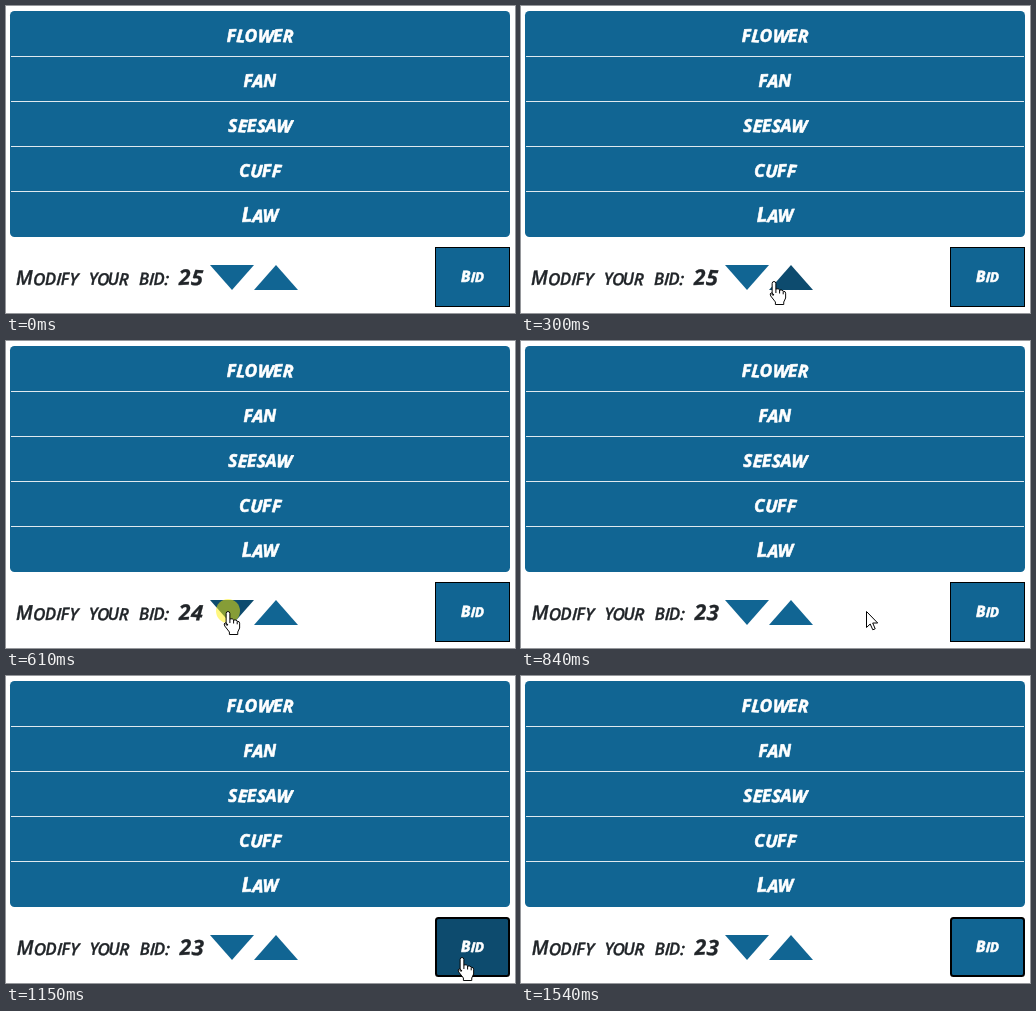
An HTML page that plays this animation: 509 by 307 pixels, repeating every 1.92 s.

```html
<!DOCTYPE html>
<html lang="en">
<head>
<meta charset="utf-8">
<title>Modify your bid</title>
<style>
  html, body { margin: 0; width: 100%; height: 100%; overflow: hidden; background: #fff; }
  svg { display: block; width: 509px; height: 307px; }
  text {
    font: italic 700 17.5px "Permanent Marker", "Open Sans", sans-serif;
    stroke-width: .6; stroke-linejoin: round; white-space: pre;
  }
  .light { fill: #fff; stroke: #fff; }
  .dark { fill: #212529; stroke: #212529; stroke-width: .3; }
  .label { font-weight: 600; font-size: 17px; }
</style>
</head>
<body>
<svg id="stage" viewBox="0 0 509 307">
  <rect x="4" y="5" width="500" height="226" rx="4.5" fill="#116593"/>
  <path d="M5 50.5H503M5 95.5H503M5 140.5H503M5 185.5H503" stroke="#dfe9ef"/>
  <g id="words"></g>
  <g id="label"></g>
  <path id="down" d="M204 259H248L226 284Z"/>
  <path id="up" d="M248 284H292L270 259Z"/>
  <rect id="button" stroke="#000"/>
  <g id="bid"></g>
  <g id="pointer">
    <circle id="press" r="12" fill="#fff000" fill-opacity=".5"/>
    <g id="hand" stroke="#000" stroke-linejoin="round">
      <path fill="#fff" d="M-2 14V2.5a2 2 0 0 1 4 0V8q3-1 4 1 3-.5 4 1.2 2.5 0 2.5 2V17l-2 4v2.5h-9V21l-5-6q-1.5-2.5 .5-3.2 1.5 0 3 2.2z" transform="scale(.93 1)"/>
      <path fill="none" d="M1.9 8v4M5.6 9v3.5M9.2 10.3v3"/>
    </g>
    <path id="arrow" fill="#fff" stroke="#000" d="M.5 .5V16.5L4.2 13 6.8 18.8 9.2 17.8 6.7 12H11.7Z"/>
  </g>
</svg>
<script>
const $ = id => document.getElementById(id);
const SVG = "http://www.w3.org/2000/svg";
const LOOP = 1920;
const BLUE = [17, 101, 147], DEEP = [13, 75, 110];

// Redraw moments in ms
const ticks = [0, 70, 150, 230, 300, 380, 460, 540, 610, 690, 770, 840,
  920, 1000, 1070, 1150, 1230, 1300, 1380, 1460, 1540];

// Pointer path: time, x, y
const path = [
  [70, 411, 287], [150, 345, 283], [230, 284, 278], [300, 253, 275],
  [380, 226, 272], [460, 222, 270], [690, 222, 270], [770, 270, 272],
  [840, 345, 270], [920, 434, 270], [1000, 453, 270], [1070, 453, 270],
  [1150, 456, 281], [1230, 458, 303]
];

// Marker lettering: capitals with a slightly uneven stance
function write(parent, str, x, y, opt = {}) {
  const el = document.createElementNS(SVG, "text");
  const set = (k, v) => el.setAttribute(k, v);
  set("x", x);
  set("y", y);
  set("class", opt.style || "light");
  set("text-anchor", opt.anchor || "start");
  set("rotate", [...str].map((c, i) => (i % 2 ? 3 : -2)).join(" "));
  if (opt.gap) set("letter-spacing", opt.gap);
  if (opt.size) el.style.fontSize = opt.size + "px";
  if (opt.cap) {
    const first = document.createElementNS(SVG, "tspan");
    first.style.fontSize = opt.cap + "px";
    first.textContent = str[0].toUpperCase();
    el.append(first, str.slice(1).toUpperCase());
  } else {
    el.textContent = str.toUpperCase();
  }
  parent.append(el);
  return el;
}

["flower", "fan", "seesaw", "cuff", "Law"].forEach((word, i) => {
  write($("words"), word, 254, 36 + 45 * i,
    { anchor: "middle", cap: word === "Law" ? 20.5 : 0 });
});

const ink = "dark label";
write($("label"), "Modify", 10, 279, { style: ink, cap: 20, gap: -.3 });
write($("label"), "your", 83, 279, { style: ink, gap: -1.1 });
write($("label"), "bid:", 133, 279, { style: ink, gap: -.5 });
const count = write($("label"), "25", 173, 279, { style: "dark", size: 21.5 });
write($("bid"), "Bid", 466.5, 276, { anchor: "middle", cap: 15.5, size: 13.5 });

const clamp = v => Math.max(0, Math.min(1, v));
const mix = k => `rgb(${BLUE.map((c, i) => Math.round(c + (DEEP[i] - c) * k))})`;
const within = (p, x, y, w, h) =>
  p && p[0] >= x && p[0] < x + w && p[1] >= y && p[1] < y + h;
const show = (id, on) => $(id).setAttribute("display", on ? "inline" : "none");

function pointerAt(t) {
  if (t < path[0][0] || t > path[path.length - 1][0]) return null;
  const i = Math.max(1, path.findIndex(k => k[0] >= t));
  const [a, b] = [path[i - 1], path[i]];
  const k = (t - a[0]) / (b[0] - a[0]);
  return [a[1] + (b[1] - a[1]) * k, a[2] + (b[2] - a[2]) * k];
}

function draw(t) {
  const p = pointerAt(t);
  const onDown = within(p, 204, 259, 44, 26);
  const onUp = within(p, 248, 259, 44, 26);
  const onButton = within(p, 429, 241, 75, 60);
  const hand = onDown || onUp || onButton;

  $("down").setAttribute("fill", mix(+!!onDown));
  $("up").setAttribute("fill", mix(+!!onUp));

  count.textContent = t < 540 ? 25 : t < 690 ? 24 : 23;
  $("label").setAttribute("transform", `translate(${t < 690 ? 0 : .7})`);

  // Hover fade, then a heavier rounded focus ring after the press
  const shade = clamp((t - 920) / 150) - clamp((t - 1280) / 240);
  const line = t >= 1070 ? 2 : 1;
  const box = {
    x: 429 + line / 2, y: 241 + line / 2,
    width: 75 - line, height: 60 - line,
    rx: line > 1 ? 2.5 : 0, "stroke-width": line, fill: mix(shade)
  };
  for (const k in box) $("button").setAttribute(k, box[k]);

  show("pointer", p);
  if (!p) return;
  $("pointer").setAttribute("transform", `translate(${p.map(Math.round)})`);
  show("hand", hand);
  show("arrow", !hand);
  show("press", [460, 610, 1000].includes(t));
}

const start = performance.now();
function frame() {
  const t = (performance.now() - start) % LOOP;
  draw(ticks.filter(k => k <= t).pop());
  requestAnimationFrame(frame);
}
frame();
</script>
</body>
</html>
```
